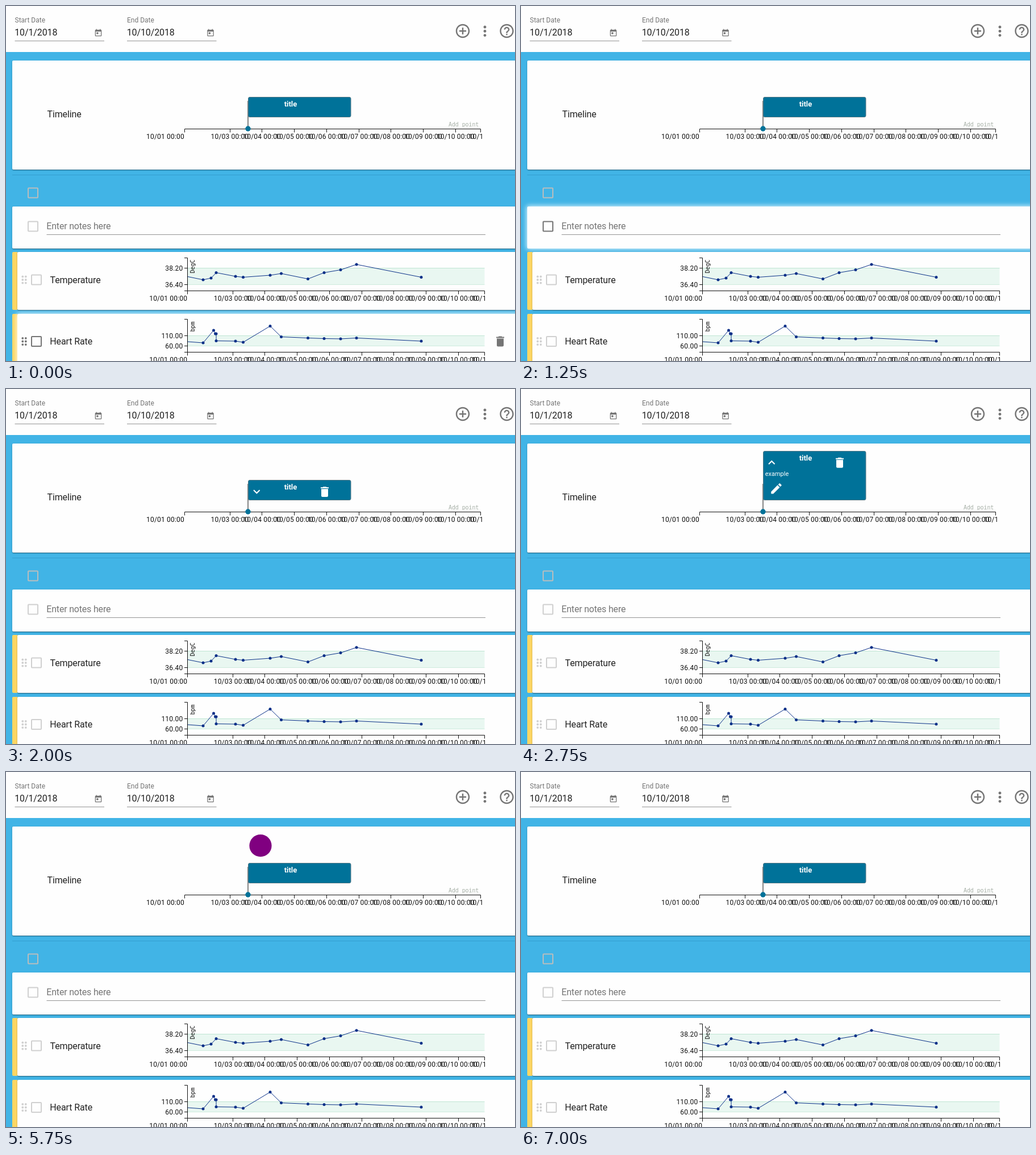
Animation of 896 by 625 pixels, one loop 8000 ms. Source, as an HTML page:

```html
<!DOCTYPE html>
<html lang="en">
<head>
<meta charset="utf-8">
<title>Timeline dashboard</title>
<style>
html, body { margin: 0; width: 100%; height: 100%; overflow: hidden; background: #41b4e6; }
#stage { position: absolute; left: 0; top: 0; width: 896px; height: 625px; overflow: hidden; background: #41b4e6; }
#head { position: absolute; left: 0; top: 0; width: 896px; height: 81px; background: #fefefe; }
.card {
  position: absolute; width: 900px; background: #fefefe; border-radius: 2px;
  box-shadow: 0 2px 1px -1px rgba(0,0,0,.2), 0 1px 1px rgba(0,0,0,.14), 0 1px 3px rgba(0,0,0,.2);
}
.bar { position: absolute; left: 11px; width: 9px; background: #fdd663; border-radius: 2px 0 0 2px; }
.card.lit { box-shadow: 0 0 8px 1px rgba(255,255,255,.85); }
svg { position: absolute; left: 0; top: 0; }
text { font-family: Roboto, sans-serif; white-space: pre; }
.big { font-size: 16px; letter-spacing: -.12px; fill: #212121; }
.hint { fill: #757575; letter-spacing: -.19px; }
.small { font-size: 12px; fill: #757575; }
.tick { font-size: 12px; letter-spacing: .2px; fill: #111; }
.mono { font: 10px "DejaVu Sans Mono", monospace; }
.icon { fill: #757575; }
.white { fill: #fff; }
.axis { fill: none; stroke: #111; }
.rule { stroke: #949494; }
.box { fill: none; stroke: #d0d0d0; stroke-width: 2; }
.box.lit { stroke: #757575; }
.grip { fill: #d0d0d0; }
.grip.lit { fill: #757575; }
</style>
</head>
<body>
<div id="stage">
  <div id="head"></div>
  <div class="card" style="left:11px;top:96px;height:192px"></div>
  <div class="card" data-hot="notes" style="left:11px;top:353px;height:74px"></div>
  <div class="bar" style="top:433px;height:102px"></div>
  <div class="card" style="left:20px;top:433px;height:102px"></div>
  <div class="bar" style="top:542px;height:102px"></div>
  <div class="card" data-hot="heart" style="left:20px;top:542px;height:102px"></div>
  <svg id="art" width="896" height="625" viewBox="0 0 896 625"></svg>
</div>
<script>
const ICON = {
  today: "M19 3h-1V1h-2v2H8V1H6v2H5c-1.11 0-1.99.9-1.99 2L3 19c0 1.1.89 2 2 2h14c1.1 0 2-.9 2-2V5c0-1.1-.9-2-2-2zm0 16H5V8h14v11zM7 10h5v5H7z",
  add: "M13 7h-2v4H7v2h4v4h2v-4h4v-2h-4V7zm-1-5C6.48 2 2 6.48 2 12s4.48 10 10 10 10-4.48 10-10S17.52 2 12 2zm0 18c-4.41 0-8-3.59-8-8s3.59-8 8-8 8 3.59 8 8-3.59 8-8 8z",
  more: "M12 8c1.1 0 2-.9 2-2s-.9-2-2-2-2 .9-2 2 .9 2 2 2zm0 2c-1.1 0-2 .9-2 2s.9 2 2 2 2-.9 2-2-.9-2-2-2zm0 6c-1.1 0-2 .9-2 2s.9 2 2 2 2-.9 2-2-.9-2-2-2z",
  help: "M11 18h2v-2h-2v2zm1-16C6.48 2 2 6.48 2 12s4.48 10 10 10 10-4.48 10-10S17.52 2 12 2zm0 18c-4.41 0-8-3.59-8-8s3.59-8 8-8 8 3.59 8 8-3.59 8-8 8zm0-14c-2.21 0-4 1.79-4 4h2c0-1.1.9-2 2-2s2 .9 2 2c0 2-3 1.75-3 5h2c0-2.25 3-2.5 3-5 0-2.21-1.79-4-4-4z",
  trash: "M6 19c0 1.1.9 2 2 2h8c1.1 0 2-.9 2-2V7H6v12zM19 4h-3.5l-1-1h-5l-1 1H5v2h14V4z",
  down: "M16.59 8.59L12 13.17 7.41 8.59 6 10l6 6 6-6z",
  up: "M12 8l-6 6 1.41 1.41L12 10.83l4.59 4.58L18 14z",
  pencil: "M3 17.25V21h3.75L17.81 9.94l-3.75-3.75L3 17.25zM20.71 7.04c.39-.39.39-1.02 0-1.41l-2.34-2.34c-.39-.39-1.02-.39-1.41 0l-1.83 1.83 3.75 3.75 1.83-1.83z"
};

const text = (x, y, str, cls, more = "") => `<text x="${x}" y="${y}" class="${cls}" ${more}>${str}</text>`;
const path = (d, cls, more = "") => `<path d="${d}" class="${cls}" ${more}/>`;
const icon = (name, cx, cy, scale = 1, cls = "icon") =>
  path(ICON[name], cls, `transform="translate(${cx} ${cy}) scale(${scale}) translate(-12 -12)"`);
const check = (cx, cy, more = "") =>
  `<rect x="${cx - 8.5}" y="${cy - 8.5}" width="17" height="17" rx="1" class="box" ${more}/>`;
const show = (name, body) => `<g data-show="${name}">${body}</g>`;

function grip(cy, more) {
  let dots = "";
  for (const x of [29.3, 34.8])
    for (const dy of [-5.6, 0, 5.6]) dots += `<circle cx="${x}" cy="${cy + dy}" r="1.9"/>`;
  return `<g class="grip" ${more}>${dots}</g>`;
}

// Day axis: the first label hangs left of the line, the last one is cut off.
function dayAxis(x0, x1, y, first, cut) {
  let d = `M${x0} ${y + 6}V${y}H${x1}V${y + 6}`, labels = "";
  for (let day = 1; day <= 11; day++) {
    if (day === 2) continue;
    const x = first + (day - 1) * 56.75;
    if (x > x0 && x < x1) d += `M${Math.floor(x) + .5} ${y}v6`;
    labels += text(x, y + 17.7, `10/${String(day).padStart(2, "0")} 00:00`, "tick", 'text-anchor="middle"');
  }
  return path(d, "axis") +
    `<clipPath id="cut${y}"><rect x="0" y="${y}" width="${cut}" height="40"/></clipPath>` +
    `<g clip-path="url(#cut${y})">${labels}</g>`;
}

const POINT_X = [347, 361, 370, 404, 417.5, 465, 484.5, 531.5, 560, 589, 617, 731];

function chart(top, unit, high, low, start, pts) {
  const axisY = top + 58;
  let s = `<rect x="320" y="${high.y}" width="522.5" height="${low.y - high.y}" fill="#e9f7f1"/>`;
  s += path(`M320 ${high.y}H842.5`, "", 'stroke="#bfe5d3"');
  s += path(`M320 ${low.y}H842.5`, "", 'stroke="#a9dcc4" stroke-dasharray="1 1"');
  s += path(`M314 ${top}H319.5V${axisY}H314M314 ${high.y}h6M314 ${low.y}h6`, "axis");
  for (const m of [high, low]) s += text(311.5, m.y + 4.3, m.label, "tick", 'text-anchor="end"');
  s += text(0, 0, unit, "mono", `transform="translate(331.5 ${top + 27 - (unit.length < 4 ? 5 : 0)}) rotate(-90)" fill="#111"`);
  s += dayAxis(319.5, 842.5, axisY, 285.7, 844.5);
  s += path(`M320 ${start}L` + pts.map(p => p.join(" ")).join("L"), "", 'fill="none" stroke="#0a3088"');
  for (const [x, y] of pts) s += `<circle cx="${x}" cy="${y}" r="2.5" fill="#0a3088"/>`;
  return s;
}

function dateField(x, label, value) {
  return text(x, 28.5, label, "small") + text(x - .3, 52.3, value, "big") +
    icon("today", x + 147, 47.6, .64) + path(`M${x} 61.5h157.5`, "rule");
}

const eventBox = top =>
  `<rect x="426.5" y="${top + .5}" width="180.5" height="${195 - top}" rx="2.5" fill="#007299" stroke="#587986"/>` +
  text(501, top + 17.2, "title", "white", 'font-size="13" font-weight="700" text-anchor="middle"');

const temps = [482, 479, 469.5, 476, 477.5, 474, 471, 480.5, 469.5, 464.5, 455, 477.5].map((y, i) => [POINT_X[i], y]);
const beats = [593, 577, 589.5, 590, 592, 563.5, 582.5, 584.5, 585.5, 586, 584.5, 590].map((y, i) => [POINT_X[i], y]);
beats.splice(1, 1, [365.5, 571], [368.5, 577], [370, 577]);

document.getElementById("art").innerHTML = [
  dateField(15.5, "Start Date", "10/1/2018"),
  dateField(213, "End Date", "10/10/2018"),
  icon("add", 804, 44, 1.22), icon("more", 843, 44.3, 1.22), icon("help", 881.5, 44, 1.22),

  text(72.5, 195.6, "Timeline", "big"),
  dayAxis(314.5, 835.5, 216.5, 280.5, 838),
  text(779, 212, "Add point", "mono", 'fill="#a7b0a7" letter-spacing="-.1"'),
  path("M426 167V216", "", 'stroke="#666" stroke-width="1.6"'),
  '<circle cx="426" cy="216" r="4.7" fill="#007299"/>',
  show("closed", eventBox(160)),
  show("hover", icon("down", 441.3, 180.7, 1, "white") + icon("trash", 561, 181, 1, "white")),
  show("open", eventBox(109) + icon("up", 441.3, 129.6, 1, "white") + icon("trash", 561, 129.7, 1, "white") +
    text(429.7, 152.6, "example", "white", 'font-size="11"') + icon("pencil", 449.5, 175.3, 1.02, "white")),
  show("dot", '<circle cx="448" cy="129.7" r="19.6" fill="#800080"/>'),

  path("M11 297.5H896", "", 'stroke="#349fd0"'),
  check(47.5, 329, 'style="stroke:#b9bdbd"'),
  check(47.5, 388, 'data-hot="notes"'),
  text(71.3, 392.8, "Enter notes here", "big hint"),
  path("M71.5 402.5H844", "rule"),

  grip(482, ""), check(53.5, 482),
  text(77.5, 487.6, "Temperature", "big"),
  chart(443.5, "DegC", { y: 461.5, label: "38.20" }, { y: 490.5, label: "36.40" }, 476.5, temps),

  grip(590.5, 'data-hot="heart"'), check(53.5, 590.5, 'data-hot="heart"'),
  text(77.3, 595.9, "Heart Rate", "big"),
  chart(551.5, "bpm", { y: 580.5, label: "110.00" }, { y: 598.5, label: "60.00" }, 591, beats),
  show("heart", icon("trash", 870, 590.5))
].join("");

// Each step: start in ms, then the parts that are on.
const STEPS = [
  [0, "closed heart"],
  [1250, "closed notes"],
  [1500, "closed"],
  [2000, "closed hover"],
  [2750, "open"],
  [5750, "closed dot"],
  [6000, "closed"]
];
const LOOP = 8000;
const shown = document.querySelectorAll("[data-show]");
const hot = document.querySelectorAll("[data-hot]");
let last = null;

function draw(now) {
  const t = now % LOOP;
  const step = STEPS.filter(s => s[0] <= t).pop() || STEPS[0];
  if (step !== last) {
    last = step;
    const on = step[1].split(" ");
    shown.forEach(el => { el.style.display = on.includes(el.dataset.show) ? "" : "none"; });
    hot.forEach(el => el.classList.toggle("lit", on.includes(el.dataset.hot)));
  }
}

const begin = performance.now();
function tick() {
  draw(performance.now() - begin);
  requestAnimationFrame(tick);
}
tick();
</script>
</body>
</html>
```
